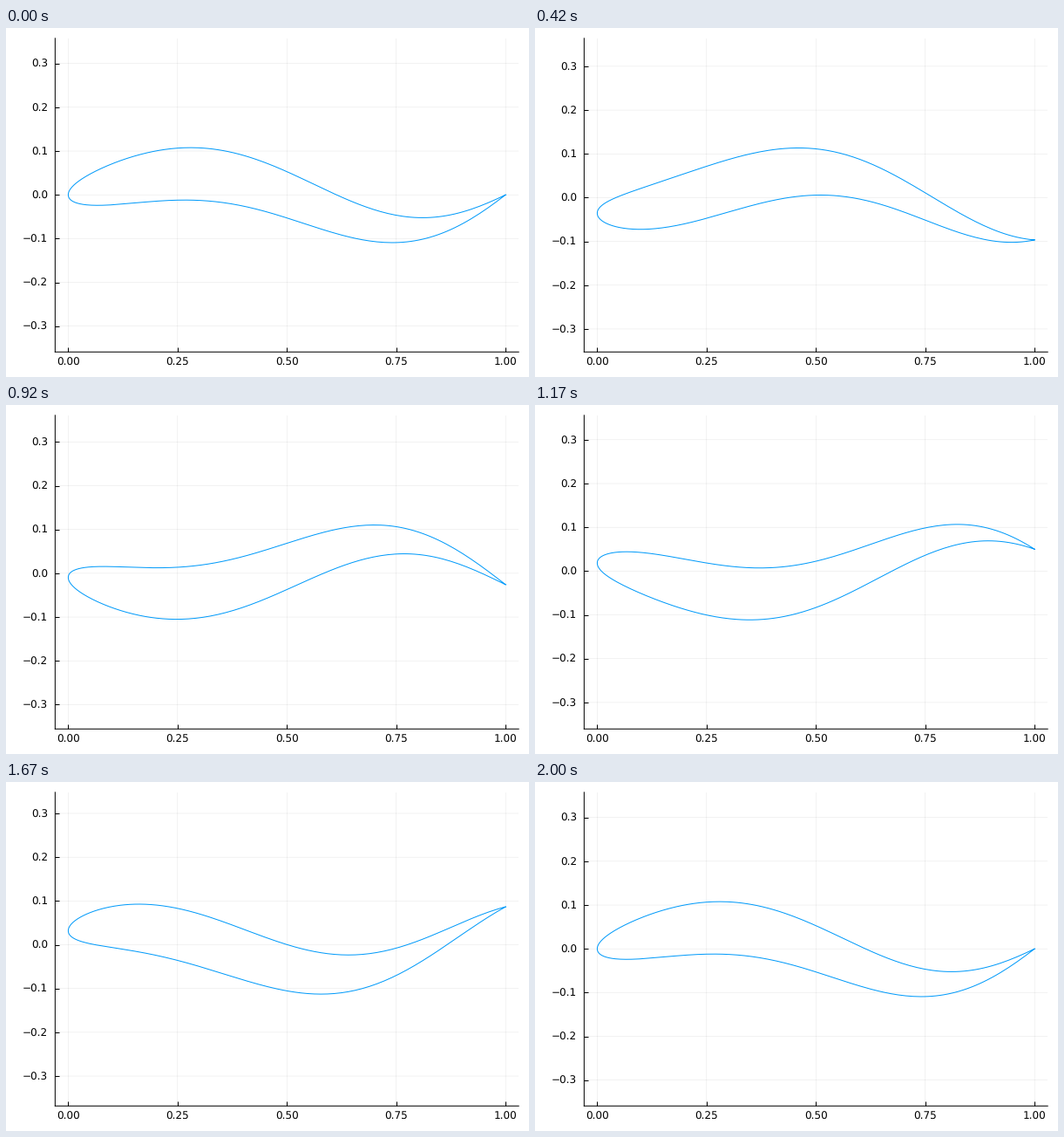
These frames come from a looping animation (600 px wide and 400 px high, 2080 ms). A matplotlib script:

```python
import numpy as np
import matplotlib.pyplot as plt
from matplotlib.animation import FuncAnimation

W, H, DPI = 600, 400, 100
TICKS = 208            # 10 ms each
STEPS = 24             # poses per swimming period
PX = 72 / DPI          # one pixel in points

LEFT, RIGHT, TOP, BOTTOM = 56.35, 588.19, 11.81, 371.3
WIDTH, HEIGHT = RIGHT - LEFT, BOTTOM - TOP
X_LIM = (-0.03, 1.03)
Y_HALF = (X_LIM[1] - X_LIM[0]) * HEIGHT / WIDTH / 2

plt.rcParams["font.family"] = "DejaVu Sans"
plt.rcParams["text.hinting"] = "none"

s = np.linspace(-1, 1, 401)
x = s**2


def thickness(x):
    """Half thickness of a closed NACA 0012 section."""
    return 0.6 * (0.2969 * np.sqrt(x) - 0.126 * x - 0.3516 * x**2
                  + 0.2843 * x**3 - 0.1036 * x**4)


def camber(x, t):
    """Travelling wave whose amplitude grows towards the tail."""
    return 0.1 * np.exp(x - 1) * np.sin(2 * np.pi * (x - t))


def outline(t):
    return camber(x, t) + np.sign(s) * thickness(x)


fig = plt.figure(figsize=(W / DPI, H / DPI), dpi=DPI, facecolor="white")
ax = fig.add_axes([LEFT / W, 1 - BOTTOM / H, WIDTH / W, HEIGHT / H])
ax.set_axisbelow(True)
ax.spines[["top", "right"]].set_visible(False)
ax.spines[["left", "bottom"]].set(linewidth=PX, snap=False)
ax.set_xticks(np.arange(5) / 4)
ax.set_yticks(np.arange(-3, 4) / 10)
ax.tick_params(direction="in", length=5 * PX, width=PX, labelsize=12 * PX)
ax.tick_params(axis="x", pad=6 * PX)
ax.tick_params(axis="y", pad=8 * PX)
ax.grid(color="black", alpha=0.1, linewidth=0.5 * PX, snap=False)
ax.set_xlim(*X_LIM)

foil, = ax.plot(x, outline(0), color="#009afa", linewidth=PX)


def update(tick):
    step = int((tick + 0.5) * 0.12)    # 12 poses per second
    y = outline(step / STEPS)
    foil.set_ydata(y)
    mid = (y.min() + y.max()) / 2
    ax.set_ylim(mid - Y_HALF, mid + Y_HALF)
    return foil,


anim = FuncAnimation(fig, update, frames=TICKS, interval=10,
                     init_func=lambda: update(0), repeat=True, repeat_delay=0)
plt.show()
```
